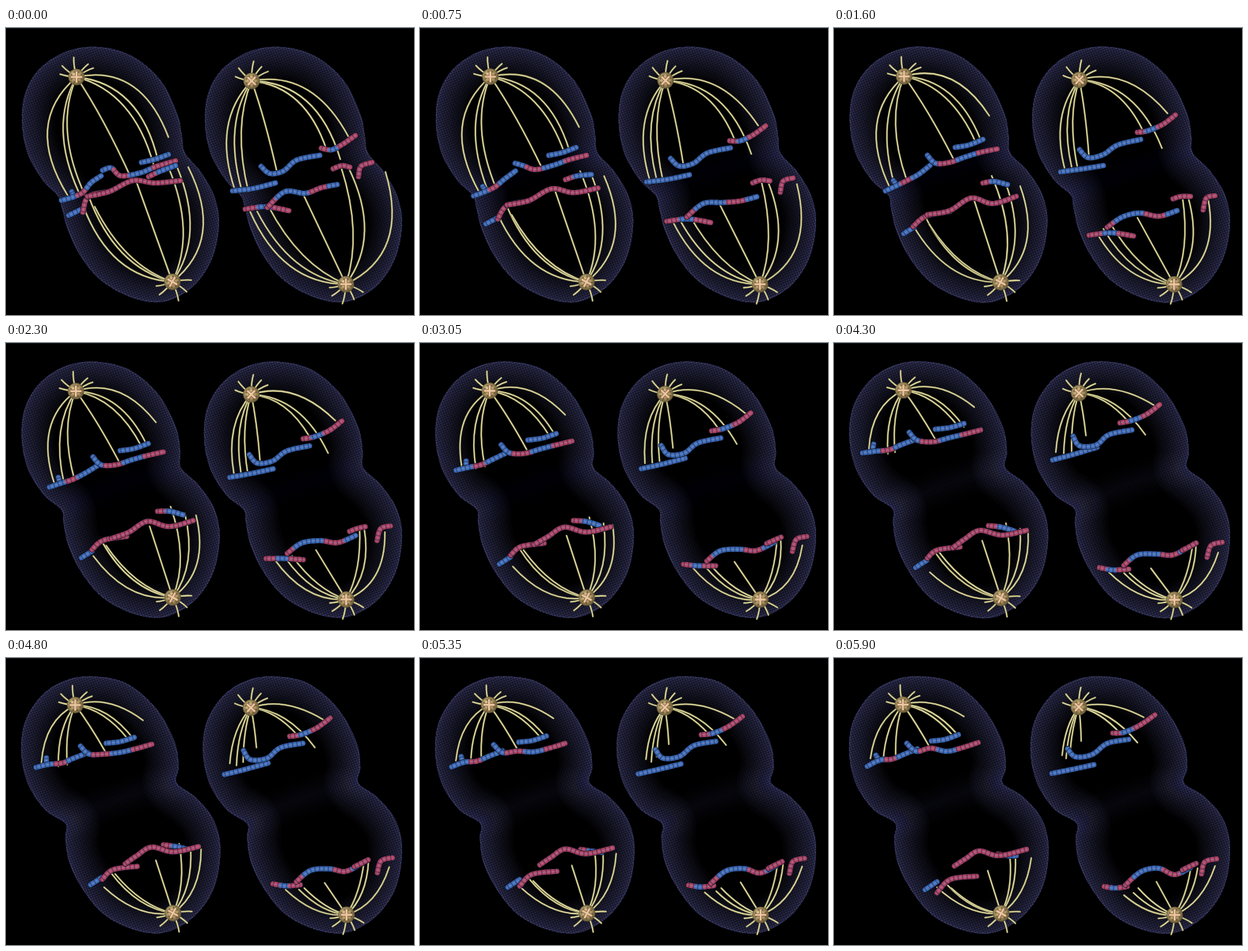
An HTML page with a canvas for the animation above (5950 ms loop, 515 by 363 pixels).

```html
<!DOCTYPE html>
<html lang="en">
<head>
<meta charset="utf-8">
<title>Cell division</title>
<style>
html, body { margin: 0; width: 100%; height: 100%; overflow: hidden; background: #000; }
canvas { display: block; width: 515px; height: 363px; }
</style>
</head>
<body>
<canvas id="stage" width="515" height="363"></canvas>
<script>
const W = 515, H = 363, LOOP = 5950, STEP = 50;
const ctx = document.getElementById('stage').getContext('2d');

// Poses are given at four moments; upper and lower halves settle differently.
const K1 = 0.271, K2 = 0.729;
const UP = 1.45, DOWN = 2.2;

const lerp = (a, b, u) => a + (b - a) * u;
const mix = (a, b, u) => a.map((v, i) => lerp(v, b[i], u));

function pose(keys, p, bend) {
  if (p < K1) return mix(keys[0], keys[1], p / K1);
  if (p < K2) return mix(keys[1], keys[2], 1 - Math.pow(1 - (p - K1) / (K2 - K1), bend));
  return mix(keys[2], keys[3], (p - K2) / (1 - K2));
}

// Catmull-Rom curve through a flat list of x, y
function curve(flat, closed, steps = 10) {
  const n = flat.length / 2, out = [];
  const at = i => {
    i = closed ? (i + n) % n : Math.max(0, Math.min(n - 1, i));
    return [flat[2 * i], flat[2 * i + 1]];
  };
  const last = closed ? n : n - 1;
  for (let i = 0; i < last; i++) {
    const a = at(i - 1), b = at(i), c = at(i + 1), d = at(i + 2);
    for (let s = 0; s < steps; s++) {
      const u = s / steps;
      out.push([0, 1].map(k => 0.5 * (2 * b[k] + (c[k] - a[k]) * u +
        (2 * a[k] - 5 * b[k] + 4 * c[k] - d[k]) * u * u +
        (3 * b[k] - a[k] - 3 * c[k] + d[k]) * u * u * u)));
    }
  }
  out.push(at(last));
  return out;
}

function trace(pts) {
  ctx.beginPath();
  pts.forEach(([x, y], i) => i ? ctx.lineTo(x, y) : ctx.moveTo(x, y));
}

function stroke(color, width) {
  ctx.strokeStyle = color;
  ctx.lineWidth = width;
  ctx.stroke();
}

// ---- membrane ----
const wide = [118,24, 160,36, 195,66, 216,108, 222,136, 226,158, 246,182, 263,213,
  269,248, 260,292, 236,327, 200,346, 162,342, 122,321, 95,290, 78,255,
  70,226, 65,212, 46,192, 27,158, 20,118, 25,80, 44,50, 78,29];
const pinched = [108,23, 150,31, 188,63, 212,105, 217,138, 213,158, 238,175, 262,203,
  271,240, 264,288, 240,325, 203,347, 165,345, 125,326, 97,293, 80,258,
  76,228, 77,209, 50,192, 28,160, 19,120, 24,80, 46,46, 75,28];

function makeMesh() {
  const tile = document.createElement('canvas');
  tile.width = tile.height = 3;
  const g = tile.getContext('2d');
  g.fillStyle = 'rgba(0,0,0,.42)';
  g.fillRect(0, 0, 3, 1);
  g.fillRect(0, 0, 1, 3);
  const mesh = ctx.createPattern(tile, 'repeat');
  mesh.setTransform(new DOMMatrix().rotate(-22));
  return mesh;
}
const mesh = makeMesh();

function drawCell(p, dx) {
  const shape = mix(wide, pinched, p);
  const rim = curve(shape, true);
  ctx.save();
  ctx.translate(dx, 0);
  trace(rim);
  ctx.clip();
  for (let i = 1; i <= 20; i++) stroke('rgba(74,80,142,.05)', 84 * Math.pow(i / 20, 1.7));
  stroke('rgba(92,98,160,.3)', 3);
  const [rx, ry] = [shape[10], shape[11]], [lx, ly] = [shape[34], shape[35]];
  ctx.beginPath();
  ctx.moveTo(lx, ly);
  ctx.quadraticCurveTo((lx + rx) / 2 - 8, (ly + ry) / 2 - 10, rx, ry);
  for (let w = 6; w <= 48; w += 6) stroke(`rgba(74,80,142,${0.016 * p})`, w);
  ctx.fillStyle = mesh;
  ctx.fillRect(0, 0, 300, H);
  ctx.restore();
}

// ---- spindle poles and fibres ----
const poles = {
  a: { from: [89, 62], to: [87, 59], turn: 0, rays: [-170, -142, -98, -48, -28] },
  b: { from: [310, 67], to: [309, 62], turn: 0.75, rays: [-165, -135, -84, -55, -30] },
  c: { from: [210, 321], to: [211, 323], turn: 0.5, rays: [165, 135, 72, 35, -5] },
  d: { from: [429, 324], to: [430, 325], turn: 0, rays: [168, 140, 100, 62, 25] }
};
const fibres = [];
// b0, b1: sideways bow at the start and end, as a share of the length
function fibre(pole, b0, b1, ...ends) {
  fibres.push({ pole, b0, b1, ends });
}

fibre('a', .42, .25, [78,212], [71,203], [44,135], [46,127]);
fibre('a', .25, .16, [92,208], [76,197], [68,140], [62,131]);
fibre('a', .22, .1, [100,212], [92,193], [77,138], [78,128]);
fibre('a', -.04, -.03, [158,190], [151,166], [128,122], [122,115]);
fibre('a', -.28, -.18, [186,172], [179,145], [157,106], [148,96]);
fibre('a', -.35, -.22, [192,168], [185,141], [164,106], [156,97]);
fibre('a', -.42, -.22, [205,138], [196,111], [177,81], [164,74]);

fibre('b', .3, .14, [289,205], [292,181], [280,138], [288,123]);
fibre('b', .22, .1, [297,203], [300,176], [290,140], [293,127]);
fibre('b', .16, .06, [306,207], [308,180], [300,138], [298,118]);
fibre('b', -.03, -.03, [342,182], [322,165], [318,117], [312,105]);
fibre('b', -.32, -.16, [405,155], [390,130], [372,100], [361,95]);
fibre('b', -.36, -.2, [422,166], [414,152], [393,116], [383,107]);
fibre('b', -.36, -.2, [432,137], [421,108], [406,80], [391,75]);

fibre('c', -.32, -.22, [97,224], [100,250], [121,290], [130,290]);
fibre('c', -.26, -.2, [104,212], [115,238], [127,264], [143,287]);
fibre('c', -.2, -.16, [112,226], [120,248], [133,265], [148,291]);
fibre('c', 0, 0, [163,190], [176,215], [187,250], [194,269]);
fibre('c', .22, .14, [205,176], [199,187], [217,228], [222,250]);
fibre('c', .27, .17, [216,176], [217,197], [235,235], [229,250]);
fibre('c', .4, .22, [230,176], [235,200], [245,237], [249,253]);

fibre('d', -.32, -.2, [308,232], [331,258], [347,290], [366,300]);
fibre('d', -.25, -.16, [317,232], [340,254], [366,291], [378,297]);
fibre('d', -.18, -.12, [331,225], [350,249], [373,291], [384,291]);
fibre('d', 0, 0, [375,210], [383,240], [400,285], [407,283]);
fibre('d', .16, .1, [423,176], [440,215], [453,252], [450,268]);
fibre('d', .3, .18, [432,176], [447,214], [457,252], [459,266]);
fibre('d', .42, .22, [479,182], [472,215], [485,265], [481,263]);

const bendOf = pole => pole < 'c' ? UP : DOWN;
const polePos = (pole, p) => mix(pole.from, pole.to, p);

function rod() {
  stroke('#7d784b', 2.3);
  stroke('#e6e0a6', 1.3);
}

function drawFibre(f, p) {
  const [x, y] = polePos(poles[f.pole], p);
  const [ex, ey] = pose(f.ends, p, bendOf(f.pole));
  const dx = ex - x, dy = ey - y, bow = lerp(f.b0, f.b1, p);
  ctx.beginPath();
  ctx.moveTo(x, y);
  ctx.quadraticCurveTo(x + dx * .42 - dy * bow, y + dy * .42 + dx * bow, ex, ey);
  rod();
}

function drawPole(pole, p) {
  const [x, y] = polePos(pole, p);
  pole.rays.forEach((deg, i) => {
    const a = deg * Math.PI / 180, len = 21 + (i * 7) % 5;
    ctx.beginPath();
    ctx.moveTo(x, y);
    ctx.quadraticCurveTo(x + Math.cos(a - .12) * len * .6, y + Math.sin(a - .12) * len * .6,
      x + Math.cos(a) * len, y + Math.sin(a) * len);
    rod();
  });
  ctx.save();
  ctx.translate(x, y);
  const ball = ctx.createRadialGradient(-3, -3, 1, 0, 0, 11);
  ball.addColorStop(0, '#d9c795');
  ball.addColorStop(.65, '#a08d5c');
  ball.addColorStop(1, '#51452a');
  ctx.fillStyle = ball;
  ctx.beginPath();
  ctx.arc(0, 0, 10.5, 0, 7);
  ctx.fill();
  ctx.rotate(pole.turn);
  ctx.fillStyle = 'rgba(62,50,26,.55)';
  for (let i = 0; i < 8; i++) {
    const a = (i + .5) * Math.PI / 4;
    ctx.fillRect(Math.cos(a) * 6.8 - 1, Math.sin(a) * 6.8 - 1, 2, 2);
  }
  ctx.beginPath();
  ctx.moveTo(-6, 0);
  ctx.lineTo(6, 0);
  ctx.moveTo(0, -6);
  ctx.lineTo(0, 6);
  stroke('#8e6144', 4);
  stroke('#e9c8a0', 2.4);
  ctx.restore();
}

// ---- chromosomes ----
const tones = { B: '#3b6cb8', R: '#ad4260' };
const strands = [];
// bands: colours in equal shares along the strand
function strand(bend, bands, ...keys) {
  strands.push({ bend, bands, keys });
}

strand(UP, 'B', [83,207, 86,214], [75,193, 79,199], [50,128, 48,138], [53,123, 57,130]);
strand(UP, 'BBBRRBBB',
  [70,218, 84,214, 97,208, 107,196, 120,187],
  [65,206, 80,199, 92,193, 107,185, 121,174],
  [36,139, 52,137, 70,135, 84,129, 103,122],
  [42,137, 58,129, 73,128, 88,122, 105,115]);
strand(UP, 'B', [171,170, 188,166, 205,160], [153,151, 170,148, 188,141],
  [128,109, 146,107, 164,102], [123,105, 140,103, 157,97]);
strand(UP, 'BRBR',
  [122,180, 133,177, 145,187, 170,183, 190,175, 214,168],
  [118,161, 128,171, 146,170, 166,163, 186,157, 206,153],
  [95,113, 105,123, 125,125, 145,120, 166,115, 185,110],
  [92,108, 104,118, 122,114, 142,118, 160,114, 182,107]);

strand(DOWN, 'RRBBB', [180,188, 195,181, 214,174], [188,196, 202,194, 219,198],
  [195,231, 212,233, 228,238], [207,248, 218,250, 230,250]);
strand(DOWN, 'B', [79,237, 98,228], [88,260, 101,252], [103,284, 117,275], [115,293, 130,283]);
strand(DOWN, 'R', [97,233, 104,213, 130,207], [100,251, 116,238, 146,232],
  [118,272, 130,262, 159,258], [130,297, 147,280, 180,276]);
strand(DOWN, 'R',
  [103,213, 130,207, 160,193, 188,196, 220,193],
  [118,236, 146,231, 173,215, 200,222, 230,213],
  [150,259, 165,248, 184,237, 212,243, 243,237],
  [152,263, 166,254, 183,244, 208,250, 243,242]);

strand(UP, 'B', [286,206, 312,203, 340,196], [286,182, 315,178, 340,174],
  [276,148, 302,141, 332,132], [275,146, 300,141, 328,135]);
strand(UP, 'B',
  [322,175, 333,184, 350,181, 367,167, 396,161],
  [310,154, 321,164, 340,160, 358,148, 387,141],
  [302,118, 310,130, 331,129, 347,116, 376,110],
  [295,115, 305,125, 326,122, 345,108, 372,103]);
strand(UP, 'RRBBRRR',
  [398,152, 411,154, 425,147, 441,136], [383,132, 396,130, 415,122, 431,110],
  [361,101, 376,98, 395,90, 411,78], [352,95, 366,94, 386,85, 405,72]);

strand(DOWN, 'RRBBRR', [302,229, 328,226, 357,231], [322,262, 350,259, 378,263],
  [335,284, 352,287, 372,286], [341,289, 355,291, 370,289]);
strand(DOWN, 'RBBBRRB',
  [330,227, 352,207, 378,209, 398,202, 418,198],
  [345,252, 364,239, 386,234, 410,238, 433,231],
  [366,281, 383,268, 408,267, 428,268, 450,257],
  [368,287, 388,270, 410,266, 430,274, 450,265]);
strand(DOWN, 'R', [413,178, 424,174, 434,176], [428,216, 438,213, 450,213],
  [440,262, 448,258, 457,253], [440,268, 448,264, 457,260]);
strand(DOWN, 'R', [445,188, 448,175, 462,170], [466,230, 470,215, 481,212],
  [471,271, 476,256, 490,252], [464,273, 468,258, 483,254]);

function drawStrand(s, p) {
  const pts = curve(pose(s.keys, p, s.bend), false);
  trace(pts);
  stroke('#141628', 7.6);
  const n = s.bands.length, end = pts.length - 1;
  for (let i = 0; i < n; i++) {
    trace(pts.slice(Math.round(i * end / n), Math.round((i + 1) * end / n) + 1));
    stroke(tones[s.bands[i]], 6.2);
  }
  trace(pts);
  stroke('rgba(205,205,245,.2)', 2.4);
  ctx.lineCap = 'butt';
  ctx.setLineDash([1.6, 4]);
  stroke('rgba(18,16,48,.4)', 6.2);
  ctx.setLineDash([]);
  ctx.lineCap = 'round';
}

function draw(t) {
  const p = t / (LOOP - STEP);
  ctx.fillStyle = '#000';
  ctx.fillRect(0, 0, W, H);
  ctx.fillStyle = '#07141a';
  ctx.fillRect(0, 0, W, 1);
  ctx.lineCap = ctx.lineJoin = 'round';
  drawCell(p, 0);
  drawCell(p, 231 - 2 * p);
  fibres.forEach(f => drawFibre(f, p));
  strands.forEach(s => drawStrand(s, p));
  Object.values(poles).forEach(pole => drawPole(pole, p));
}

const start = performance.now();
let shown = -1;
function tick() {
  const t = Math.floor((performance.now() - start) % LOOP / STEP) * STEP;
  if (t !== shown) draw(shown = t);
  requestAnimationFrame(tick);
}
tick();
</script>
</body>
</html>
```
